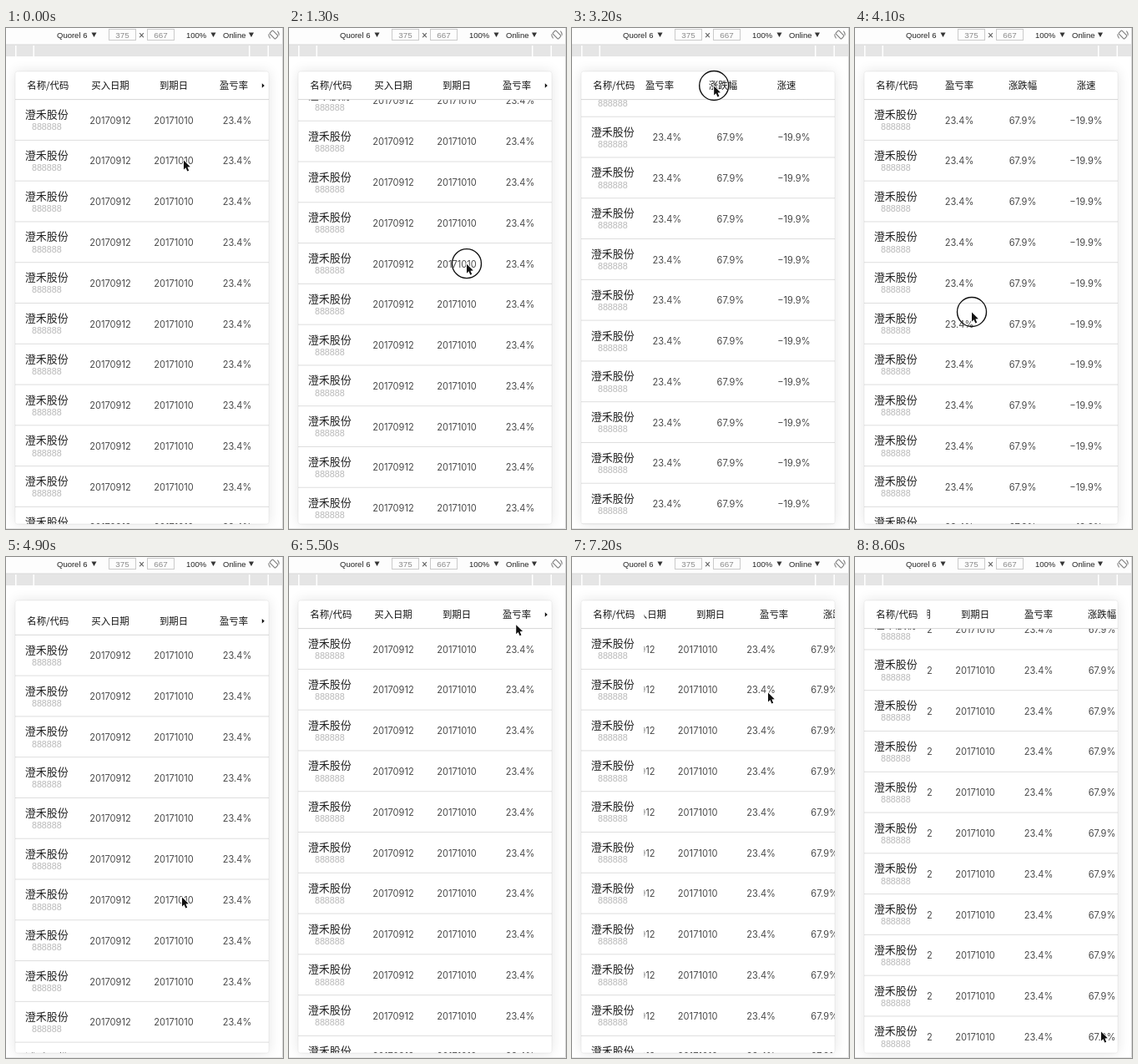
Animation of 332 by 600 pixels, one loop 8.7 s. Source, as an HTML page with a canvas:

```html
<!DOCTYPE html>
<html lang="zh-CN">
<head>
<meta charset="utf-8">
<title>Scrolling table</title>
<style>
html, body { margin: 0; width: 100%; height: 100%; overflow: hidden; background: #fff; }
canvas { display: block; width: 332px; height: 600px; }
</style>
</head>
<body>
<canvas id="stage"></canvas>
<script>
const W = 332, H = 600, LOOP = 8700, STEP = 100;
const CARD = { x: 11, y: 52, r: 315, b: 594 };
const FIXED_RIGHT = 86.5, HEAD_BOTTOM = 85.6;
const ROW_H = 48.78, ROWS = 16, COL_X = 125, COL_W = 76;
const MAX_Y = HEAD_BOTTOM + ROWS * ROW_H - CARD.b;
const MAX_X = 5 * COL_W - (CARD.r - 87);
const CJK = '"Noto Sans CJK SC", "Noto Sans CJK", sans-serif';
const LATIN = 'Inter, sans-serif';
const UI = '"Liberation Sans", sans-serif';
const STOCK = '澄禾股份', CODE = '888888';
const HEADS = ['买入日期', '到期日', '盈亏率', '涨跌幅', '涨速'];
const CELLS = ['20170912', '20171010', '23.4%', '67.9%', '−19.9%'];

// A swipe presses at (x, y), drags along its axis until up, and glides until rest.
// scroll is the lasting shift, spring an overshoot that comes back.
const PAUSE = 150;
const SWIPES = [
  { down: -PAUSE, up: -PAUSE, x: 213, y: 158 },
  { down: 870, up: 1500, rest: 1800, x: 213, y: 404, axis: 'y', drag: -160, scroll: MAX_Y },
  { down: 1900, up: 2600, rest: 2700, x: 270, y: 240, axis: 'x', drag: -132, scroll: MAX_X },
  { down: 3040, up: 3300, rest: 3360, x: 197, y: 69, axis: 'x', drag: -40, spring: 20, head: true },
  { down: 3500, up: 3850, rest: 4000, x: 190, y: 220, axis: 'y', drag: 142, scroll: -MAX_Y },
  { down: 4100, up: 4300, rest: 4400, x: 140, y: 340, axis: 'x', drag: 100, scroll: -MAX_X },
  { down: 4500, up: 4750, rest: 4925, x: 211, y: 327, axis: 'y', drag: 80, spring: -42 },
  { down: 5586, up: 6150, rest: 6300, x: 275, y: 66, axis: 'x', drag: -54, scroll: 57, head: true },
  { down: 6430, up: 6650, rest: 6730, x: 190, y: 162, axis: 'x', drag: 100, scroll: -57 },
  { down: 6830, up: 7050, rest: 7300, x: 285, y: 162, axis: 'x', drag: -50, scroll: 57 },
  { down: 7400, up: 7900, rest: 8600, x: 225, y: 410, axis: 'y', drag: -110, scroll: 169.8 },
  { down: 8500, up: 8500, x: 295, y: 568 }
];

const canvas = document.getElementById('stage');
const ctx = canvas.getContext('2d');
const ratio = window.devicePixelRatio || 1;
canvas.width = W * ratio;
canvas.height = H * ratio;

function progress(t, a, b) {
  if (t >= b) return 1;
  return Math.max(0, (t - a) / (b - a));
}

function smooth(t, a, b) {
  const u = progress(t, a, b);
  return u * u * (3 - 2 * u);
}

function scrollAt(axis, t) {
  return SWIPES.filter(s => s.axis === axis).reduce((sum, s) => sum
    + (s.scroll || 0) * smooth(t, s.down, s.rest)
    + (s.spring || 0) * Math.sin(Math.PI * progress(t, s.down, s.rest)), 0);
}

function pointerAt(t) {
  const i = SWIPES.findLastIndex(s => t >= s.down);
  const s = SWIPES[i], next = SWIPES[i + 1] || s;
  const p = { x: s.x, y: s.y, pressed: t < s.up };
  if (s.axis) p[s.axis] += s.drag * smooth(t, s.down, s.up);
  const k = smooth(t, s.up + PAUSE, next.down);
  if (next !== s) {
    p.x += (next.x - p.x) * k;
    p.y += (next.y - p.y) * k;
  }
  return p;
}

function text(str, x, y, size, family, color, align = 'center') {
  ctx.font = `${size}px ${family}`;
  ctx.fillStyle = color;
  ctx.textAlign = align;
  ctx.fillText(str, x, y);
}

function rect(x, y, w, h, color) {
  ctx.fillStyle = color;
  ctx.fillRect(x, y, w, h);
}

function poly(points, fill) {
  ctx.beginPath();
  points.forEach(([x, y]) => ctx.lineTo(x, y));
  ctx.closePath();
  ctx.fillStyle = fill;
  ctx.fill();
}

function clipped(x, y, r, b, draw) {
  ctx.save();
  ctx.beginPath();
  ctx.rect(x, y, r - x, b - y);
  ctx.clip();
  draw();
  ctx.restore();
}

function cardPath() {
  ctx.beginPath();
  ctx.roundRect(CARD.x, CARD.y, CARD.r - CARD.x, CARD.b - CARD.y, 2.5);
}

function sizeBox(x, label) {
  ctx.strokeStyle = '#cacaca';
  ctx.lineWidth = 1;
  ctx.strokeRect(x + .5, 1.5, 32, 13);
  text(label, x + 16.5, 12, 9.8, UI, '#8a8a8a');
}

function dropdown(label, x, arrowX) {
  text(label, x, 11.8, 9.5, UI, '#222', 'left');
  poly([[arrowX, 5.5], [arrowX + 6, 5.5], [arrowX + 3, 11]], '#333');
}

function drawRotateIcon() {
  ctx.save();
  ctx.translate(321, 8);
  ctx.rotate(-Math.PI / 4);
  ctx.strokeStyle = '#777';
  ctx.lineWidth = 1;
  ctx.beginPath();
  ctx.roundRect(-2.7, -4.8, 5.4, 9.6, 1);
  ctx.stroke();
  for (const from of [0, Math.PI]) {
    ctx.beginPath();
    ctx.arc(0, 0, 6.2, from, from + .9);
    ctx.stroke();
  }
  ctx.restore();
}

function drawToolbar() {
  rect(0, 0, W, 20, '#fdfdfd');
  dropdown('Quorel 6', 61, 102.5);
  sizeBox(123, '375');
  text('×', 162.5, 13, 12, UI, '#444');
  sizeBox(169, '667');
  dropdown('100%', 216, 245.5);
  dropdown('Online', 260, 291);
  drawRotateIcon();

  rect(0, 20, W, 14, '#e5e5e5');
  rect(0, 19.5, W, .8, '#d6d6d6');
  [11, 32.5, 291, 313.5].forEach(x => rect(x, 21, 1.5, 13, '#fff'));
}

function drawHeader(x, pull) {
  const base = 73.3 + pull;
  const label = (str, cx) => text(str, cx, base, 11.38, CJK, '#111');
  rect(CARD.x, CARD.y, CARD.r - CARD.x, HEAD_BOTTOM + pull - CARD.y, '#fff');
  label('名称/代码', 50.3);
  const resting = x < 1;
  clipped(FIXED_RIGHT, CARD.y, CARD.r, CARD.b, () => {
    HEADS.forEach((head, i) => {
      const shift = resting && i === 2 ? -4 : 0;
      label(head, COL_X + i * COL_W - x + shift);
    });
    if (resting) {
      const y = 69 + pull;
      poly([[306.8, y - 2.8], [309.8, y], [306.8, y + 2.8]], '#111');
    }
  });
  rect(CARD.x, HEAD_BOTTOM + pull - .5, CARD.r - CARD.x, 1, '#d8d8d8');
}

function drawRows(x, y) {
  for (let i = 0; i < ROWS; i++) {
    const top = HEAD_BOTTOM + i * ROW_H - y;
    if (top > CARD.b || top + ROW_H < CARD.y) continue;
    text(STOCK, 48.8, top + 22.5, 13, CJK, '#222');
    text(CODE, 48.8, top + 36.7, 10.7, UI, '#b8b8b8');
    clipped(FIXED_RIGHT, top, CARD.r, top + ROW_H, () => {
      CELLS.forEach((cell, c) =>
        text(cell, COL_X + c * COL_W - x, top + 29, 11.1, LATIN, '#4a4a4a'));
    });
    rect(CARD.x, top + ROW_H - .5, CARD.r - CARD.x, 1, '#dedede');
  }
}

function drawTable(headX, bodyX, y) {
  const pull = Math.max(0, -y);
  ctx.save();
  ctx.shadowColor = 'rgba(0,0,0,.11)';
  ctx.shadowBlur = 15 * ratio;
  cardPath();
  ctx.fillStyle = '#fff';
  ctx.fill();
  ctx.restore();

  ctx.save();
  cardPath();
  ctx.clip();
  clipped(CARD.x, HEAD_BOTTOM + pull, CARD.r, CARD.b, () => drawRows(bodyX, y));
  drawHeader(headX, pull);
  ctx.restore();

  cardPath();
  ctx.strokeStyle = 'rgba(0,0,0,.08)';
  ctx.lineWidth = .8;
  ctx.stroke();
}

function drawPointer({ x, y, pressed }) {
  if (pressed) {
    ctx.beginPath();
    ctx.arc(x, y, 17.5, 0, Math.PI * 2);
    ctx.strokeStyle = '#111';
    ctx.lineWidth = 1.4;
    ctx.stroke();
  }
  const arrow = [[0, 0], [0, 11], [2.5, 8.7], [4.3, 13], [6.2, 12.2], [4.4, 8], [7.8, 7.8]];
  ctx.save();
  ctx.translate(x, y + .5);
  ctx.lineJoin = 'round';
  poly(arrow, '#111');
  ctx.strokeStyle = '#fff';
  ctx.lineWidth = 1.6;
  ctx.stroke();
  poly(arrow, '#111');
  ctx.restore();
}

function draw(t) {
  ctx.setTransform(ratio, 0, 0, ratio, 0, 0);
  rect(0, 0, W, H, '#fff');
  drawToolbar();

  // The part not being dragged follows one step behind.
  const lead = scrollAt('x', t), lag = scrollAt('x', t - STEP);
  const headLeads = SWIPES.some(s => s.head && t >= s.down && t <= s.rest + STEP);
  drawTable(headLeads ? lead : lag, headLeads ? lag : lead, scrollAt('y', t));

  rect(W - 1, 0, 1, H, '#d6d6d6');
  rect(0, H - 1, W, 1, '#e6e6e6');
  drawPointer(pointerAt(t));
}

const start = performance.now();
function tick() {
  const t = (performance.now() - start) % LOOP;
  draw(Math.floor(t / STEP) * STEP);
  requestAnimationFrame(tick);
}
tick();
</script>
</body>
</html>
```
